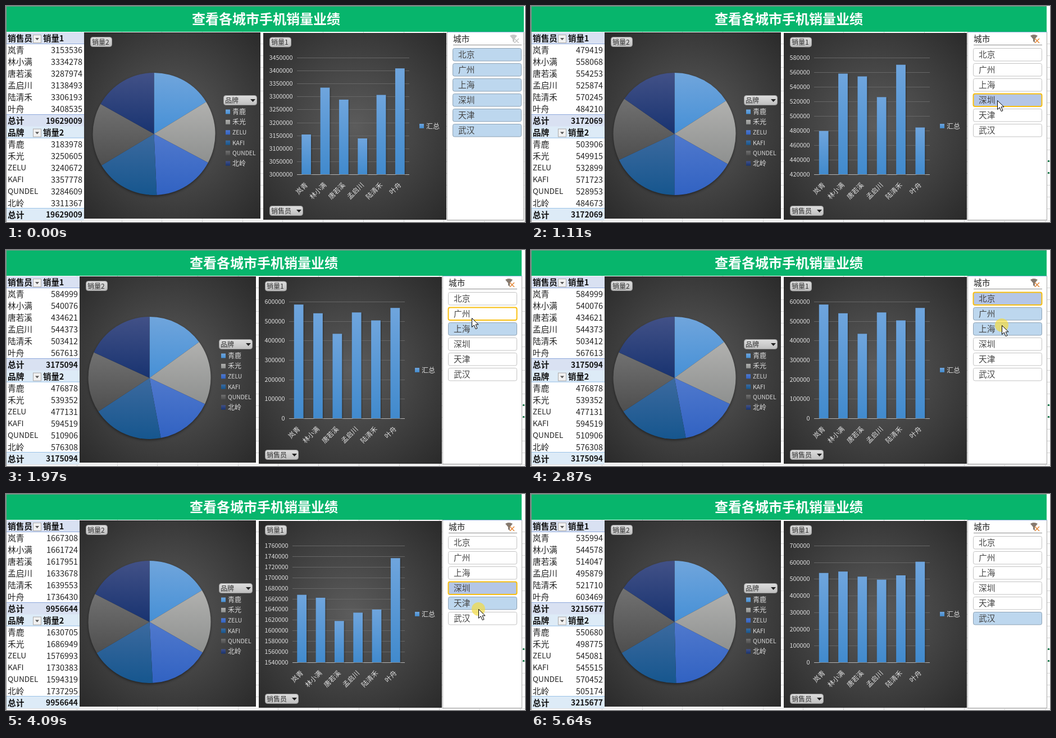
Recreate the animation shown at these times as an HTML page. Size 924 by 385 pixels, loop 6.64 s.

```html
<!DOCTYPE html>
<html lang="zh">
<head>
<meta charset="utf-8">
<title>手机销量</title>
<style>
  html, body { margin: 0; width: 100%; height: 100%; overflow: hidden; background: #fff; }
  svg { display: block; font-family: "Noto Sans CJK SC", "Noto Sans CJK", "Noto Sans CJK JP", sans-serif; }
  text { white-space: pre; }
  #pie { filter: drop-shadow(0 2px 2px rgba(0, 0, 0, .45)); }
  .bar { filter: drop-shadow(1px 1px 1px rgba(0, 0, 0, .4)); }
</style>
</head>
<body>
<svg width="924" height="385" viewBox="0 0 924 385">
  <defs id="defs"></defs>
  <g id="stage"></g>
</svg>
<script>
const LOOP = 6640;
const people = ['岚青', '林小满', '唐若溪', '孟启川', '陆清禾', '叶舟'];
const brands = ['青鹿', '禾光', 'ZELU', 'KAFI', 'QUNDEL', '北岭'];
const cities = ['北京', '广州', '上海', '深圳', '天津', '武汉'];
const sliceColors = [
  ['#70a5dc', '#4690d6'], ['#b1b1af', '#8e908f'], ['#5079cd', '#3162c2'],
  ['#3c6a9f', '#16568e'], ['#717171', '#4e4e4e'], ['#425187', '#183370']
];

// axis: [min, max, step]
const all = {
  people: [3153536, 3334278, 3287974, 3138493, 3306193, 3408535],
  brands: [3183978, 3250605, 3240672, 3357778, 3284609, 3311367],
  axis: [3000000, 3450000, 50000]
};
const shenzhen = {
  people: [479419, 558068, 554253, 525874, 570245, 484210],
  brands: [503906, 549915, 532899, 571723, 528953, 484673],
  axis: [420000, 580000, 20000]
};
const shanghai = {
  people: [584999, 540076, 434621, 544373, 503412, 567613],
  brands: [476878, 539352, 477131, 594519, 510906, 576308],
  axis: [0, 600000, 100000]
};
const firstThree = {
  people: [1667308, 1661724, 1617951, 1633678, 1639553, 1736430],
  brands: [1630705, 1686949, 1576993, 1730383, 1594319, 1737295],
  axis: [1540000, 1760000, 20000]
};
const wuhan = {
  people: [535994, 544578, 514047, 495879, 521710, 603469],
  brands: [550680, 498775, 545081, 545515, 570452, 505174],
  axis: [0, 700000, 100000]
};
const minus = (a, b) => a.map((v, i) => v - b[i]);
const lastThree = {
  people: minus(all.people, firstThree.people),
  brands: minus(all.brands, firstThree.brands),
  axis: [1350000, 1700000, 50000]
};

const bursts = [
  [340, 990, 7], [1110, 1750, 7], [1870, 1970, 2], [2090, 2530, 5], [2630, 2870, 3],
  [3090, 3750, 7], [3870, 4310, 5], [4750, 4750, 1], [4970, 5090, 2], [5310, 5640, 4]
];
const ticks = [0, ...bursts.flatMap(([a, b, n]) =>
  Array.from({ length: n }, (_, i) => Math.round((a + (b - a) * i / Math.max(1, n - 1)) / 10) * 10))];

// Pointer waypoints: [time, x, y]
const route = [
  [340, 846, 350], [770, 830, 180], [880, 830, 168], [1110, 830, 168], [1540, 829, 143],
  [1870, 829, 143], [1970, 829, 121], [2200, 832, 88], [2420, 832, 88], [2870, 838, 134],
  [3090, 838, 138], [3530, 839, 168], [3750, 839, 168], [4090, 841, 205], [4310, 841, 222],
  [5310, 841, 222], [5530, 900, 310]
];
// [press, release, data shown after release]
const clicks = [
  [990, 1110, shenzhen], [1750, 1870, shanghai], [2420, 3090, firstThree],
  [3750, 4750, lastThree], [5090, 5310, wuhan]
];

const sum = list => list.reduce((a, b) => a + b, 0);

function pointer(t) {
  if (t < route[0][0] || t > route[route.length - 1][0]) return null;
  const i = Math.max(1, route.findIndex(p => p[0] >= t));
  const [t0, x0, y0] = route[i - 1], [t1, x1, y1] = route[i];
  const k = (t - t0) / (t1 - t0);
  return { x: x0 + (x1 - x0) * k, y: y0 + (y1 - y0) * k };
}
const rowAt = t => Math.min(5, Math.max(0, Math.floor((pointer(t).y - 73) / 27)));

function stateAt(t) {
  const s = { data: all, from: 0, to: 5, hover: -1, pressed: false, pos: pointer(t) };
  if (s.pos) {
    const y = s.pos.y - 75;
    if (y >= 0 && y % 27 < 24 && y < 159) s.hover = Math.floor(y / 27);
  }
  for (const [press, release, data] of clicks) {
    if (t < press) break;
    s.from = rowAt(press);
    s.to = rowAt(Math.min(t, release));
    s.pressed = t < release;
    if (s.pressed) s.hover = s.from;
    else s.data = data;
  }
  return s;
}

const rect = (x, y, w, h, fill, more = '') =>
  `<rect x="${x}" y="${y}" width="${w}" height="${h}" fill="${fill}" ${more}/>`;
const line = (x1, y1, x2, y2, color) =>
  `<path d="M${x1} ${y1}L${x2} ${y2}" stroke="${color}" fill="none"/>`;
// y is the middle of the glyphs
const text = (str, x, y, size, fill, more = '') =>
  `<text x="${x}" y="${y + size * .38}" font-size="${size}" fill="${fill}" ${more}>${str}</text>`;
const END = 'text-anchor="end"', BOLD = 'font-weight="700"';
const latinSize = str => /[A-Z]/.test(str) ? 10.4 : 12;

function dropButton(x, y) {
  return rect(x + .5, y + .5, 14, 14, '#f1f1f1', 'stroke="#ababab"') +
    `<path d="M${x + 4} ${y + 6}h7l-3.5 4z" fill="#555"/>`;
}

function table(title, field, names, values, top, right, fill, edge) {
  const mid = i => top + 10.8 + 20.95 * i;
  const totalTop = Math.round(top + 20.95 * 7);
  let out = rect(1, top, right + 2, 21, fill) + rect(1, totalTop, right + 2, 21, fill) +
    line(1, top + 20.5, right + 3, top + 20.5, edge) +
    line(1, totalTop - .5, right + 3, totalTop - .5, edge) +
    text(title, 3, mid(0), 14.67, '#111', BOLD) + dropButton(48, top + 4) +
    text(field, 66, mid(0), 14.4, '#111', BOLD);
  names.forEach((name, i) => {
    out += text(name, 3, mid(i + 1), /[A-Z]/.test(name) ? 13.6 : 14.67, '#222') +
      text(values[i], right, mid(i + 1), 14.4, '#222', END);
  });
  return out + text('总计', 3, mid(7), 14.67, '#111', BOLD) +
    text(sum(values), right, mid(7), 13.8, '#111', BOLD + END.padStart(END.length + 1));
}

function fieldButton(label, x, y, w, drop) {
  return rect(x + .5, y + .5, w - 1, 17, 'url(#chip)', 'rx="4" stroke="#999"') +
    text(label, x + 3, y + 9, 12, '#333') +
    (drop ? `<path d="M${x + w - 12} ${y + 7}h9l-4.5 5z" fill="#222"/>` : '');
}

function pieChart(values) {
  const cx = 255.5, cy = 228, r = 109, total = sum(values);
  const rim = a => `${cx + r * Math.sin(a)} ${cy - r * Math.cos(a)}`;
  let angle = 0, slices = '', legend = '';
  values.forEach((v, i) => {
    const next = angle + v / total * Math.PI * 2;
    slices += `<path d="M${cx} ${cy}L${rim(angle)}A${r} ${r} 0 0 1 ${rim(next)}z" fill="url(#slice${i})"/>`;
    angle = next;
    const y = 188.5 + 18.4 * i;
    legend += rect(383, y - 4, 8, 8, `url(#slice${i})`) +
      text(brands[i], 395, y, latinSize(brands[i]), '#dcdcdc');
  });
  return rect(131, 47, 314, 332, 'url(#board)') + `<g id="pie">${slices}</g>` + legend +
    fieldButton('销量2', 142, 55, 39) + fieldButton('品牌', 379, 159, 60, true);
}

function barChart(values, [min, max, step]) {
  const left = max >= 1e6 ? 510 : 504, right = 710, base = 300, height = 208;
  const yOf = v => base - (v - min) / (max - min) * height;
  let out = rect(450, 48, 326, 333, 'url(#board)');
  for (let v = min; v <= max; v += step) {
    const y = Math.round(yOf(v));
    out += line(left, y + .5, right, y + .5, v === min ? '#b5b5b5' : '#666') +
      text(v, left - 7.5, y, 10.8, '#e0e0e0', END);
  }
  const pitch = (right - left) / 6;
  values.forEach((v, i) => {
    const cx = left + pitch * (i + .5), y = yOf(v);
    out += rect(cx - 8.4, y, 16.8, base - y, 'url(#bar)', 'class="bar"') +
      `<g transform="translate(${cx} 316.5) rotate(-45)">${text(people[i], 0, 0, 12, '#dcdcdc', END)}</g>`;
  });
  return out + rect(728, 210, 8, 8, 'url(#bar)') + text('汇总', 740, 214, 12, '#dcdcdc') +
    fieldButton('销量1', 461, 55.5, 39) + fieldButton('销售员', 461, 356, 60, true);
}

function slicer({ data, from, to, hover }, width) {
  const filtered = data !== all;
  const grey = filtered ? '#85796e' : '#c6c6c6', cross = filtered ? '#e58a3c' : '#c6c6c6';
  let out = rect(777.5, 46.5, width, 335, '#fff', 'stroke="#a6a6a6"') +
    line(778, 46.5, 778 + width, 46.5, '#8fb4d9') +
    text('城市', 788, 58, 14.67, '#222', 'font-weight="500"') +
    line(788, 69.5, 910, 69.5, '#8c8c8c') +
    `<path d="M889 53q6-4 13 0l-5 6v6l-3-2v-4z" fill="${grey}"/>` +
    `<path d="M897 58l8 8m0-8l-8 8" stroke="${cross}" stroke-width="1.6"/>`;
  cities.forEach((city, i) => {
    const on = i >= Math.min(from, to) && i <= Math.max(from, to), hot = i === hover;
    const fill = on ? (hot ? '#b4c6e7' : '#bdd7ee') : '#fff';
    const edge = hot ? '#f9bf10' : on ? '#8fa3b5' : '#c3c3c3';
    const y = 75 + 27 * i;
    out += rect(787.5, y + .5, 122, 22.5, fill, `rx="3" stroke="${edge}" stroke-width="${hot ? 2 : 1}"`) +
      text(city, 797, y + 11.5, 14.67, '#444');
  });
  return out;
}

function sheetGrid(dx) {
  let out = '';
  for (let x = 126.5 + dx; x < 924; x += 71.7) out += line(Math.floor(x) + .5, 46, Math.floor(x) + .5, 385, '#d6d6d6');
  for (let i = 1; i <= 16; i++) {
    const y = Math.round(46 + 21 * i) + .5;
    out += line(0, y, 924, y, '#d9d9d9');
  }
  return out;
}

function arrow({ x, y }, pressed) {
  return (pressed ? `<circle cx="${x}" cy="${y}" r="12" fill="#f5dc3c" fill-opacity=".68"/>` : '') +
    `<path transform="translate(${x} ${y})" d="M.5.5v16l3.8-3.6 2.9 6.8 2.8-1.2-2.9-6.6h5z" fill="#fff" stroke="#000"/>`;
}

function draw(s) {
  const wide = s.data === all, dx = wide ? 8 : 0, right = 128 + dx, edge = wide ? 922 : 918;
  return rect(0, 0, 924, 385, '#fff') + sheetGrid(dx) +
    rect(0, 0, edge, 46, '#07b56c') + line(0, .5, edge, .5, '#7d9488') +
    text('查看各城市手机销量业绩', edge / 2 + (wide ? 2 : 0), 22.5, 24, '#fff', BOLD + ' text-anchor="middle"') +
    rect(1, 47, right + 2, 335, '#fff') +
    table('销售员', '销量1', people, s.data.people, 47, right, '#d9e1f2', '#8ea9db') +
    table('品牌', '销量2', brands, s.data.brands, 214.6, right, '#ddebf7', '#9bc2e6') +
    line(.5, 0, .5, 385, '#8f8f8f') +
    `<g transform="translate(${dx} 0)">` + pieChart(s.data.brands) +
    barChart(s.data.people, s.data.axis) + slicer(s, wide ? 136 : 141) + '</g>' +
    (wide ? '' : rect(920, 275, 3, 3, '#1d7a4c') + rect(920, 296, 3, 3, '#1d7a4c')) +
    (s.pos ? arrow(s.pos, s.pressed) : '');
}

const vertical = (id, [top, bottom]) =>
  `<linearGradient id="${id}" x2="0" y2="1"><stop stop-color="${top}"/><stop offset="1" stop-color="${bottom}"/></linearGradient>`;
document.getElementById('defs').innerHTML =
  sliceColors.map((c, i) => vertical('slice' + i, c)).join('') +
  vertical('bar', ['#6fa5dd', '#418acd']) + vertical('chip', ['#dedede', '#bfbfbf']) +
  '<radialGradient id="board" r=".72"><stop stop-color="#5c5c5c"/><stop offset="1" stop-color="#292929"/></radialGradient>';

const stage = document.getElementById('stage');
const start = performance.now();
let shown = -1;
function frame() {
  const t = (performance.now() - start) % LOOP;
  const tick = ticks.filter(v => v <= t).pop();
  if (tick !== shown) {
    shown = tick;
    stage.innerHTML = draw(stateAt(tick));
  }
  requestAnimationFrame(frame);
}
frame();
</script>
</body>
</html>
```
